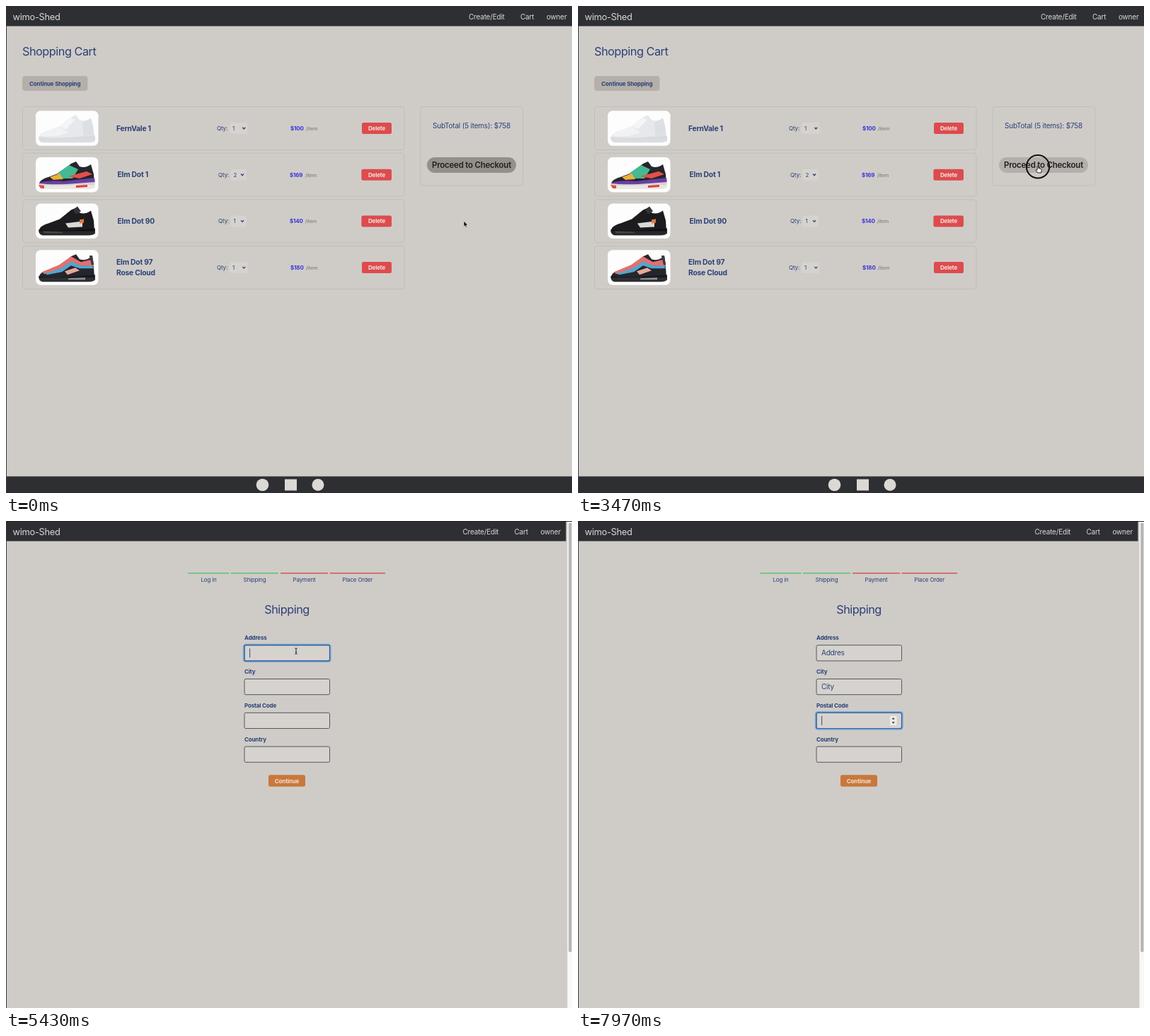
Animation of 800x689 px, one loop 8 s. Source, as an HTML page:

```html
<!DOCTYPE html>
<html lang="en">
<head>
<meta charset="utf-8">
<title>Shop checkout</title>
<style>
  html, body { margin: 0; width: 100%; height: 100%; overflow: hidden; background: #cfccc8; }
  svg { display: block; width: 100%; height: 100%; }
  text { font-family: Inter, "Liberation Sans", sans-serif; white-space: pre; }
</style>
</head>
<body>
<svg id="stage" viewBox="0 0 800 689"></svg>
<script>
const LOOP = 8000;
const NAVY = '#2b4075', BG = '#cfccc8', DARK = '#2d2f33', PALE = '#dcd8d4', FIELD = '#d6d3cf';
const stage = document.getElementById('stage');

function el(parent, name, attrs = {}) {
  const node = document.createElementNS('http://www.w3.org/2000/svg', name);
  for (const key in attrs) node.setAttribute(key, attrs[key]);
  parent.appendChild(node);
  return node;
}
const group = (parent, attrs) => el(parent, 'g', attrs);
const path = (parent, d, fill, more) => el(parent, 'path', { d, fill, ...more });
function rect(parent, x, y, width, height, fill, rx = 0, more) {
  return el(parent, 'rect', { x, y, width, height, fill, rx, ...more });
}
// cy is the middle of the capitals
function label(parent, x, cy, size, str, fill = NAVY, more = {}) {
  const node = el(parent, 'text', {
    x, y: cy + size * 0.363, 'font-size': size, fill,
    'letter-spacing': -size * (size > 15 ? 0.03 : 0.02), ...more
  });
  node.textContent = str;
  return node;
}
const BOLD = { 'font-weight': 700 };
const MID = { 'text-anchor': 'middle' };
const END = { 'text-anchor': 'end' };

function header(page, shift) {
  rect(page, 0, 0, 800 - shift, 28.5, DARK);
  label(page, 9.5, 15.5, 12.8, 'wimo-Shed', PALE);
  label(page, 654 - shift, 15.5, 10, 'Create/Edit', PALE);
  label(page, 727 - shift, 15.5, 10, 'Cart', PALE);
  label(page, 792.5 - shift, 15.5, 10, 'owner', PALE, END);
}

// ---- cart page ----
const UPPER = 'M5 39Q4 32 18 28L34 22 50 9 57 6 62 13Q70 16 78 10L82 24 83 39Z';
const SOLE = 'M4 37Q20 39 44 38L84 35 84 42Q82 45 74 45L10 45Q4 44 4 37Z';
const SHOES = [
  { upper: '#e6e8eb', sole: '#d6d9dd', parts: [
    ['M18 28L34 22 46 31 30 36 7 36Q8 31 18 28Z', '#f1f2f4'],
    ['M66 17L78 11 81 25 82 35 68 35Z', '#dcdfe3'], ['M35 22L50 10 55 13 43 26Z', '#f4f5f7']] },
  { upper: '#26252b', sole: '#e9e4dc', parts: [
    ['M5 36Q20 32 40 34L83 29 84 37 44 40 6 40Z', '#6a3fa6'],
    ['M30 23L47 11 60 17 52 30 36 30Z', '#46b892'], ['M20 28L34 23 39 31 25 32Z', '#e9b13c'],
    ['M46 27L72 20 80 24 62 30Z', '#e2504a'], ['M57 40L73 39 73 42 57 43Z', '#d9413f'],
    ['M4 39L12 40 12 44 7 44Z', '#dc5048']] },
  { upper: '#1c1c1f', sole: '#101012', parts: [
    ['M53 9L59 4 64 11 57 15Z', '#333337'], ['M42 28L66 25 66 33 46 34Z', '#d9d9d8'],
    ['M62 23L68 22 68 27 62 28Z', '#e2793c'], ['M10 39L38 40 38 42 12 42Z', '#48484c']] },
  { upper: '#25262b', sole: '#17181b', parts: [
    ['M9 31L33 21 50 9 64 17 80 13 82 23 62 22 50 18 35 28 12 34Z', '#e56f6d'],
    ['M13 33L35 26 50 16 64 22 80 22 82 26 62 26 50 22 37 31 16 35Z', '#52a6cf'],
    ['M41 30L56 25 62 29 45 35Z', '#e9a89a'], ['M46 40L70 39 70 42 46 42Z', '#8b8f96'],
    ['M76 8L80 8 82 21 79 21Z', '#3b3c42']] }
];
function photo(page, y, shoe) {
  const g = group(page, { transform: `translate(42 ${y})` });
  rect(g, 0, 0, 88.5, 49.5, '#fdfdfd', 7);
  path(g, UPPER, shoe.upper);
  shoe.parts.forEach(([d, fill]) => path(g, d, fill));
  path(g, SOLE, shoe.sole, { opacity: 0.9 });
  shoe.parts.slice(-2).forEach(([d, fill]) => path(g, d, fill));
}

const ITEMS = [
  { name: ['FernVale 1'], qty: 1, price: 100, dx: 0 },
  { name: ['Elm Dot 1'], qty: 2, price: 169, dx: 1.5 },
  { name: ['Elm Dot 90'], qty: 1, price: 140, dx: 1.5 },
  { name: ['Elm Dot 97', 'Rose Cloud'], qty: 1, price: 180, dx: 0 }
];
const EDGE = { stroke: '#c1bdb9', 'stroke-width': 1 };

function itemRow(page, item, i) {
  const top = 142.5 + i * 65.7, cy = top + 30.5, dx = item.dx;
  rect(page, 23.5, top, 539.5, 61, '#cfccc8', 4, EDGE);
  photo(page, top + 5.7, SHOES[i]);
  item.name.forEach((line, n) =>
    label(page, 156 + dx, cy + (n - (item.name.length - 1) / 2) * 15, 10.3, line, NAVY, BOLD));
  label(page, 298 + dx * 1.4, cy, 8, 'Qty:');
  rect(page, 316 + dx, cy - 8, 25.5 - dx * 2, 16, FIELD, 3);
  label(page, 320 + dx, cy, 8, item.qty);
  path(page, `M${334.3 - dx * 1.5} ${cy - 1.2}l2 2.2 2-2.2`, 'none', { stroke: NAVY, 'stroke-width': 1.3 });
  label(page, 402 - dx * 0.7, cy, 8, '$' + item.price, '#3835d6', BOLD);
  label(page, 423.7 - dx * 0.7, cy + 0.5, 7, '/item', '#8d8987', { 'font-weight': 600 });
  rect(page, 503 - dx * 0.4, cy - 8, 42 + dx * 0.4, 16, '#dd4b4e', 2.5);
  label(page, 524, cy, 8, 'Delete', '#f3e4e1', { ...BOLD, ...MID });
}

const cart = group(stage);
rect(cart, 0, 0, 800, 689, BG);
header(cart, 0);
label(cart, 23, 64.5, 16.3, 'Shopping Cart');
rect(cart, 23, 99, 92.5, 21, '#b5afaa', 4);
label(cart, 69.2, 109.6, 8, 'Continue Shopping', NAVY, { ...BOLD, ...MID });
ITEMS.forEach((item, i) => itemRow(cart, item, i));
rect(cart, 586, 142.5, 144.5, 111.5, BG, 4, EDGE);
label(cart, 658, 169, 10, 'SubTotal (5 items): $758', NAVY, MID);
const checkout = rect(cart, 595, 214, 126, 22, '#958f89', 11);
label(cart, 658, 225, 11.5, 'Proceed to Checkout', '#1f1f24', { 'font-weight': 600, ...MID });
rect(cart, 0, 665.5, 800, 24, DARK);
el(cart, 'circle', { cx: 362.5, cy: 677.5, r: 8.8, fill: PALE });
rect(cart, 394, 669.5, 17, 16, PALE);
el(cart, 'circle', { cx: 441, cy: 677.5, r: 8.5, fill: PALE });

// ---- shipping page ----
const shipping = group(stage);
rect(shipping, 0, 0, 800, 689, BG);
rect(shipping, 793.5, 0, 6.5, 689, '#f8f8f8');
rect(shipping, 795.3, 2.5, 4.2, 607.5, '#b6b3b5', 2);
header(shipping, 8.5);
rect(shipping, 0, 0, 800, 1, '#222327');
[['Log in', 257.5, 315.5, '#4cc264'], ['Shipping', 318, 385, '#4cc264'],
 ['Payment', 388, 455, '#cf4744'], ['Place Order', 457.5, 536, '#cf4744']].forEach(([str, a, b, color]) => {
  rect(shipping, a, 73.2, b - a, 1.3, color);
  label(shipping, (a + b) / 2, 83.3, 8, str, NAVY, MID);
});
label(shipping, 397, 125, 16.3, 'Shipping', NAVY, MID);

const fields = ['Address', 'City', 'Postal Code', 'Country'].map((name, i) => {
  const y = 175.7 + i * 47.8;
  label(shipping, 337, y - 10.4, 8, name, NAVY, BOLD);
  rect(shipping, 337, y, 120.5, 22.2, FIELD, 2, { stroke: '#57575a', 'stroke-width': 1 });
  const glow = group(shipping);
  rect(glow, 336, y - 1, 122.5, 24.2, 'none', 3, { stroke: '#7fa9d6', 'stroke-width': 2.4 });
  rect(glow, 337, y, 120.5, 22.2, 'none', 2, { stroke: '#2c5f9c', 'stroke-width': 1.2 });
  return { y, glow, text: label(shipping, 344, y + 11, 10, '') };
});
const spinner = group(shipping);
rect(spinner, 441, 275.7, 9.5, 13.4, '#eeece9', 1.5);
path(spinner, 'M443.6 280.6l2.1-2.6 2.1 2.6zM443.6 284.2l2.1 2.6 2.1-2.6z', '#333');
const caret = rect(shipping, 0, 0, 0.9, 13, '#2b3f73');
rect(shipping, 371, 359.3, 52, 16.4, '#c9783b', 2.5);
label(shipping, 397, 367.6, 8, 'Continue', '#f0e0d2', { ...BOLD, ...MID });

rect(stage, 0, 28, 1, 661, '#3a3b3e');

// ---- pointer ----
const ring = el(stage, 'circle', { r: 16.2, fill: 'none', stroke: '#111', 'stroke-width': 2 });
const pointer = group(stage);
const shapes = {
  arrow: path(pointer, 'M0 0V8.4L1.9 6.7 3.2 9.6 4.6 9 3.4 6.1H5.9Z', '#111',
    { stroke: '#eee', 'stroke-width': 0.7 }),
  hand: path(pointer, 'M-.8-1.6Q0-2.6.8-1.6L1 1.6 4.2 2.3Q5.6 2.8 5.3 4.4L4.5 8H-.2L-2.8 4.4Q-2.6 3-.9 4Z', '#f4f4f4',
    { stroke: '#111', 'stroke-width': 0.9 }),
  beam: path(pointer, 'M-1.8-4Q0-4 0-3Q0-4 1.8-4M0-3V3.2M-1.8 4.2Q0 4.2 0 3.2Q0 4.2 1.8 4.2M-1 1.4H1', 'none',
    { stroke: '#1a1a1a', 'stroke-width': 0.9 })
};

// ---- timeline ----
const PAGE_AT = 4240, HIDE_AT = 5930;
const CLICKS = [[3400, 3560], [5090, 5230]];
const easeIn = u => u * u;
const easeOut = u => 1 - (1 - u) ** 2;
const easeBoth = u => u * u * (3 - 2 * u);
const MOVES = [
  { from: 2750, to: 3300, a: [647, 304], b: [650, 228], ease: easeBoth },
  { from: 4170, to: 4370, a: [650, 228], b: [622, 234], ease: easeIn },
  { from: 4370, to: 4980, a: [622, 234], b: [410, 184], ease: easeOut }
];
const TYPING = [
  { str: 'Addres', keys: [5950, 6190, 6320, 6500, 6640, 6780] },
  { str: 'City', keys: [7150, 7290, 7430, 7560] }
];
const FOCUS = [[5100, 6940], [6940, 7800], [7800, LOOP]];

const clamp = v => Math.max(0, Math.min(1, v));
const show = (node, on) => node.setAttribute('display', on ? 'inline' : 'none');

function pointerAt(t) {
  let pos = MOVES[0].a;
  for (const { from, to, a, b, ease } of MOVES) {
    if (t < from) break;
    const u = ease(clamp((t - from) / (to - from)));
    pos = a.map((v, i) => v + (b[i] - v) * u);
  }
  return pos;
}

function drawForm(t) {
  show(caret, false);
  fields.forEach(({ y, glow, text }, i) => {
    const { str = '', keys = [] } = TYPING[i] || {};
    const typed = keys.filter(k => k <= t);
    text.textContent = str.slice(0, typed.length);
    const [start, end] = FOCUS[i] || [LOOP, LOOP];
    glow.setAttribute('opacity', clamp((t - start) / 150) * (1 - clamp((t - end) / 150)));
    if (t < start || t >= end) return;
    const idle = t - Math.max(start, ...typed);
    caret.setAttribute('x', 344.2 + (typed.length ? text.getComputedTextLength() : 0));
    caret.setAttribute('y', y + 4.6);
    show(caret, idle % 1000 < 500);
  });
  show(spinner, t >= FOCUS[2][0]);
}

function render(t) {
  const onForm = t >= PAGE_AT;
  show(cart, !onForm);
  show(shipping, onForm);
  if (onForm) drawForm(t);

  const [x, y] = pointerAt(t);
  const hover = !onForm && y < 236;
  const overField = onForm && x < 457 && y < 198;
  checkout.setAttribute('fill', hover ? '#b5afaa' : '#958f89');
  const kind = hover ? 'hand' : overField ? 'beam' : 'arrow';
  for (const key in shapes) show(shapes[key], key === kind);
  pointer.setAttribute('transform', `translate(${x} ${y})`);
  show(pointer, t < HIDE_AT);
  ring.setAttribute('cx', x);
  ring.setAttribute('cy', y - 0.7);
  show(ring, CLICKS.some(([a, b]) => t >= a && t < b));
}

const began = performance.now();
function tick() {
  render((performance.now() - began) % LOOP);
  requestAnimationFrame(tick);
}
tick();
</script>
</body>
</html>
```
